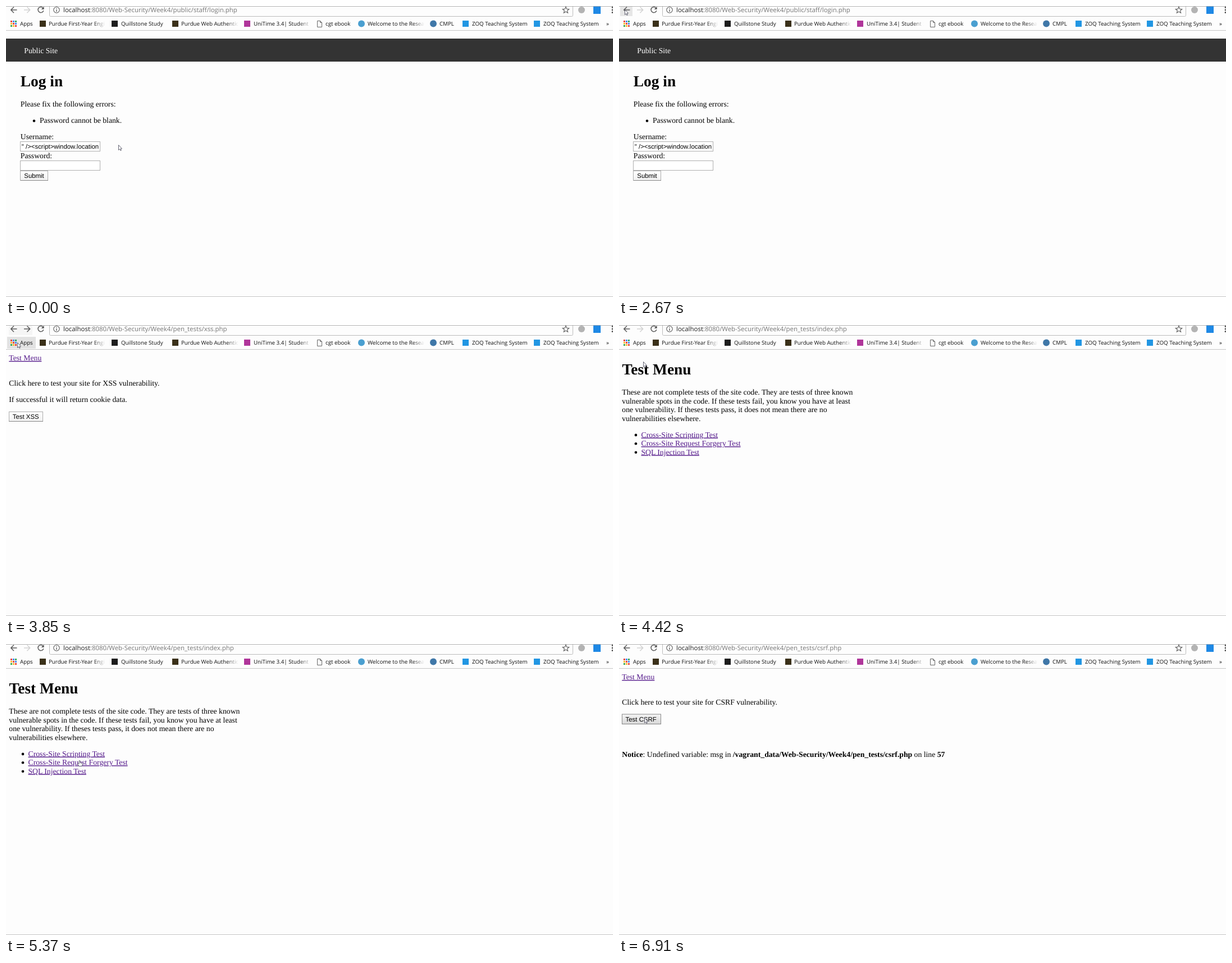
These frames come from a looping animation (1081 by 518 pixels, 8 s). An HTML page:

```html
<!DOCTYPE html>
<html lang="en">
<head>
<meta charset="utf-8">
<title>Security test pages</title>
<style>
  html, body { margin: 0; width: 100%; height: 100%; overflow: hidden; background: #fdfdfd; }
  svg { display: block; width: 1081px; height: 518px; }
  text { white-space: pre; text-rendering: geometricPrecision; }
  .page { font: 13.71px "Liberation Serif", serif; fill: #000; }
  .title { font-size: 27.4px; font-weight: bold; }
  .bold { font-weight: bold; }
  .link { fill: #551a8b; text-decoration: underline; }
  .form { font: 11.4px "Liberation Sans", sans-serif; }
  .input { fill: #fff; stroke: #b0b0b0; }
  .button { fill: url(#idle); stroke: #adadad; }
  .hover .button { fill: url(#lit); stroke: #8a8a8a; }
  .pressed .button { fill: #d6d6d6; }
  .edge { stroke: #858585; }
  .url { font: 11.45px "Open Sans", sans-serif; fill: #222; }
  #bookmarks { font: 9.75px "Open Sans", sans-serif; fill: #111; }
  .icon { fill: none; stroke: #5a5a5a; stroke-width: 1.5; }
  .thin { stroke-width: 1.1; }
  .pointer { fill: #fff; stroke: #555566; stroke-width: .9; stroke-linejoin: round; }
</style>
</head>
<body>
<svg viewBox="0 0 1081 518">
  <defs>
    <linearGradient id="idle" x2="0" y2="1"><stop stop-color="#fff"/><stop offset="1" stop-color="#f1f1f1"/></linearGradient>
    <linearGradient id="lit" x2="0" y2="1"><stop stop-color="#f4f4f4"/><stop offset="1" stop-color="#d8d8d8"/></linearGradient>
    <linearGradient id="fade"><stop stop-color="#fdfdfd" stop-opacity="0"/><stop offset=".8" stop-color="#fdfdfd"/></linearGradient>
  </defs>
  <rect width="1081" height="518" fill="#fdfdfd"/>

  <!-- toolbar -->
  <rect id="backHover" x="2" y="1" width="22" height="17" fill="#e6e6e6"/>
  <rect id="navTint" x="5" y="1" width="42" height="17" fill="#f5f5f5"/>
  <rect id="appsHover" x="2" y="21" width="51" height="21" fill="#e2e2e2"/>
  <path d="M0 .5H1081" stroke="#b4b4b4"/>
  <path d="M77.5 1V16.5q0 2 2 2H1007.5q2 0 2-2V1" fill="none" stroke="#bcbcbc"/>
  <path d="M0 43.5H1081" stroke="#c6c6c6"/>
  <path class="icon" d="M19.5 7H9M14 1.8L8.8 7l5.2 5.2"/>
  <path class="icon" id="forward" d="M32 7H42.5M37.5 1.8L42.7 7l-5.2 5.2"/>
  <path class="icon" d="M66.3 4A5 5 0 1 0 66.8 8.2"/>
  <path d="M67.6 1v5h-5z" fill="#5a5a5a"/>
  <circle class="icon thin" cx="90" cy="7" r="5.2"/>
  <path d="M90 3.8v1.3M90 6.3v4" stroke="#5a5a5a" stroke-width="1.3"/>
  <path class="icon thin" d="M997 1.5l1.6 3.8 4.1.3-3.1 2.7 1 4-3.6-2.2-3.6 2.2 1-4-3.1-2.7 4.1-.3z"/>
  <circle cx="1025" cy="7" r="6" fill="#b3b3b3"/>
  <rect x="1046" y="1" width="13" height="13" fill="#1e88e5"/>
  <g fill="#5a5a5a"><circle cx="1080" cy="2.5" r="1.5"/><circle cx="1080" cy="7" r="1.5"/><circle cx="1080" cy="11.5" r="1.5"/></g>
  <text class="url" x="102" y="11.3">localhost<tspan id="path" fill="#777"></tspan></text>
  <g id="bookmarks"></g>

  <!-- pages -->
  <g class="page" id="login">
    <rect y="58" width="1081" height="41" fill="#333"/>
    <text x="32.3" y="83.5" fill="#fff">Public Site</text>
    <text class="title" x="25.8" y="142.5">Log in</text>
    <text x="25.8" y="179">Please fix the following errors:</text>
    <circle cx="50" cy="204.5" r="2.3"/>
    <text x="60" y="208">Password cannot be blank.</text>
    <text x="25.8" y="237.3">Username:</text>
    <rect class="input" x="25.5" y="241.5" width="142" height="17"/>
    <text class="form" x="27.8" y="254">" /&gt;&lt;script&gt;window.location</text>
    <text x="25.8" y="271.3">Password:</text>
    <rect class="input" x="25.5" y="275.5" width="142" height="17"/>
    <rect class="button" x="25.5" y="293.5" width="49" height="17"/><path class="edge" d="M26 310.5H75"/>
    <text class="form" x="32.3" y="306">Submit</text>
  </g>

  <g class="page" id="xss">
    <text class="link" x="5.3" y="63">Test Menu</text>
    <text x="5.3" y="107.5">Click here to test your site for XSS vulnerability.</text>
    <text x="5.3" y="136.7">If successful it will return cookie data.</text>
    <rect class="button" x="5.5" y="154.5" width="60" height="17"/><path class="edge" d="M5 171.5H66"/>
    <text class="form" x="11.8" y="167">Test XSS</text>
  </g>

  <g class="page" id="index">
    <text class="title" x="5.5" y="87.7">Test Menu</text>
    <text x="5.3" y="124">These are not complete tests of the site code. They are tests of three known</text>
    <text x="5.3" y="139.5">vulnerable spots in the code. If these tests fail, you know you have at least</text>
    <text x="5.3" y="155">one vulnerability. If theses tests pass, it does not mean there are no</text>
    <text x="5.3" y="170.5">vulnerabilities elsewhere.</text>
    <circle cx="30" cy="195.9" r="2.3"/><text class="link" x="39.5" y="199.6">Cross-Site Scripting Test</text>
    <circle cx="30" cy="211.3" r="2.3"/><text class="link" x="39.5" y="215.1">Cross-Site Request Forgery Test</text>
    <circle cx="30" cy="226.7" r="2.3"/><text class="link" x="39.5" y="230.5">SQL Injection Test</text>
  </g>

  <g class="page" id="csrf">
    <text class="link" x="5.3" y="63">Test Menu</text>
    <text x="5.3" y="107.5">Click here to test your site for CSRF vulnerability.</text>
    <rect class="button" x="5.5" y="125" width="69" height="17.5"/><path class="edge" d="M5 142.5H75"/>
    <text class="form" x="11.6" y="137.7">Test CSRF</text>
    <text x="5.3" y="201.3"><tspan class="bold">Notice</tspan>: Undefined variable: msg in <tspan class="bold">/vagrant_data/Web-Security/Week4/pen_tests/csrf.php</tspan> on line <tspan class="bold">57</tspan></text>
  </g>

  <path d="M0 517.5H1081" stroke="#c4c4c4"/>
  <path class="pointer" id="pointer"/>
</svg>
<script>
const $ = id => document.getElementById(id);

// bookmarks: label, text x, icon shape, icon x, icon colour, fade end
const icon = {
  square: (x, c) => `<rect x="${x}" y="26" width="11" height="11" fill="${c}"/>`,
  circle: (x, c) => `<circle cx="${x + 6}" cy="31.5" r="6" fill="${c}"/>`,
  file: x => `<path d="M${x + .5} 26.5h5l3 3v8h-8zm5 0v3h3" fill="#fff" stroke="#666"/>`,
  grid: x => [0, 1, 2, 3, 4, 5, 6, 7, 8].map(i =>
    `<rect x="${x + i % 3 * 4}" y="${26 + (i / 3 | 0) * 4}" width="3" height="3" fill="${['#e8453c', '#f9bb2d', '#3aa757', '#4688f1'][i * 3 % 4]}"/>`).join('')
};
$('bookmarks').innerHTML = [
  ['Apps', 25, 'grid', 8],
  ['Purdue First-Year Engi', 76, 'square', 60, '#3a3018', 176],
  ['Quillstone Study', 205, 'square', 188, '#1c1c1c'],
  ['Purdue Web Authentic', 312, 'square', 296, '#3a3018', 413],
  ['UniTime 3.4| Student S', 441, 'square', 424, '#b0359a', 542],
  ['cgt ebook', 569, 'file', 554],
  ['Welcome to the Resea', 644, 'circle', 627, '#4a9fd0', 744],
  ['CMPL', 772, 'circle', 755, '#3f77a8'],
  ['ZOQ Teaching System', 830, 'square', 813, '#2196e3'],
  ['ZOQ Teaching System', 957, 'square', 940, '#2196e3'],
  ['»', 1069]
].map(([label, x, kind, iconX, colour, end]) =>
  (kind ? icon[kind](iconX, colour) : '') + `<text x="${x}" y="35">${label}</text>` +
  (end ? `<rect x="${end - 20}" y="24" width="26" height="16" fill="url(#fade)"/>` : '')
).join('');

const shapes = {
  arrow: 'M.5 .5V9.5L2.6 7.6 4 10.5 5.3 9.9 4 7H6.5z',
  hand: 'M3 1v5.5L1.5 5.5 .5 6.5 3 10.5H8L9 8V5.5L5 4.2V1Q4 0 3 1z',
  beam: 'M0 .5H2Q3 .5 3 1.5V9Q3 10 2 10H0M6 .5H4Q3 .5 3 1.5V9Q3 10 4 10H6'
};

// pointer jumps: time, x, y, shape
const moves = [
  [0, 200, 247], [150, 206, 270], [300, 205, 273], [420, 203, 276],
  [1100, 180, 275], [1230, 144, 271], [1370, 132, 287], [1490, 114, 293],
  [1610, 76, 235], [1730, 45, 165, 'beam'], [1880, 18, 90], [2000, 1, 33],
  [2150, 4, 14], [2270, 4, 4], [2420, 7, 5], [2550, 10, 7], [2670, 10, 6],
  [3290, 9, 7], [3440, 36, 43], [3590, 28, 36], [3710, 20, 23], [3850, 20, 31],
  [4010, 44, 58], [4160, 43, 63, 'hand'], [4280, 43, 65, 'hand'], [4420, 43, 65],
  [4550, 66, 87, 'beam'], [4700, 112, 160, 'beam'], [4830, 155, 225], [4950, 112, 245],
  [5100, 110, 223, 'hand'], [5250, 122, 214, 'hand'], [5370, 127, 207, 'hand'],
  [6060, 175, 259], [6210, 196, 303], [6360, 175, 268], [6520, 112, 200],
  [6650, 52, 132], [6790, 45, 131]
];
const pages = [
  [0, 'login', 'public/staff/login.php'], [2830, 'xss', 'pen_tests/xss.php'],
  [4420, 'index', 'pen_tests/index.php'], [5930, 'csrf', 'pen_tests/csrf.php']
];
const show = (id, on) => $(id).style.display = on ? '' : 'none';

function draw() {
  const t = performance.now() % 8000;
  const current = list => list.findLast(step => step[0] <= t);
  const during = (from, to) => t >= from && t < to;

  const [, page, path] = current(pages);
  pages.forEach(([, id]) => show(id, id === page));
  $('path').textContent = ':8080/Web-Security/Week4/' + path;
  $('forward').style.stroke = page === 'xss' ? '' : '#d2d2d2';
  show('backHover', during(2150, 2830));
  show('navTint', page === 'xss');
  show('appsHover', during(3590, 4160));
  $('csrf').classList.toggle('hover', t >= 6650);
  $('csrf').classList.toggle('pressed', during(6790, 6910));

  const [, x, y, shape = 'arrow'] = current(moves);
  $('pointer').setAttribute('d', shapes[shape]);
  $('pointer').setAttribute('transform', `translate(${x} ${y})`);
  requestAnimationFrame(draw);
}
draw();
</script>
</body>
</html>
```
